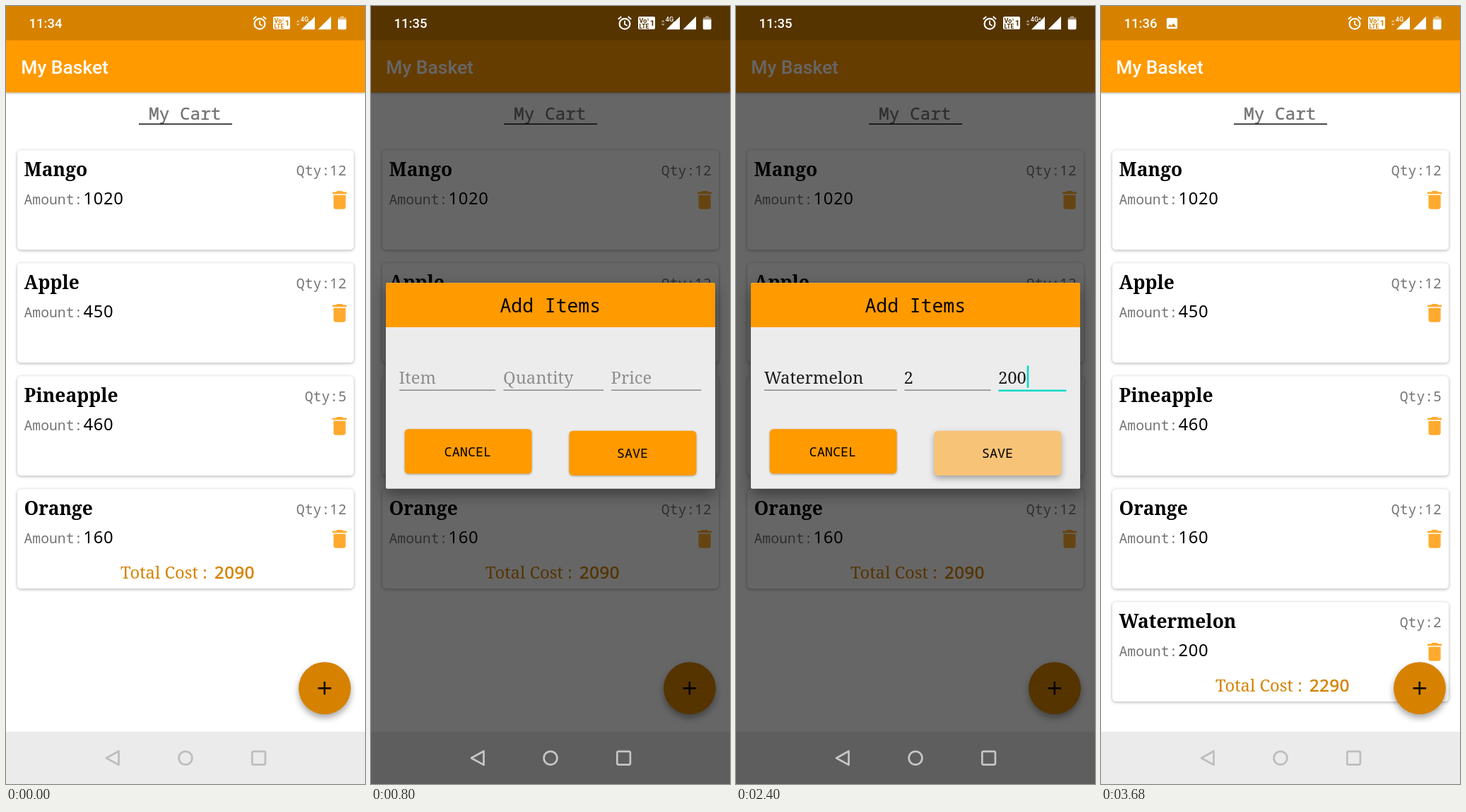
An HTML page for the animation above (4 s loop, 508 by 1102 pixels).

```html
<!DOCTYPE html>
<html lang="en">
<head>
<meta charset="utf-8">
<title>My Basket</title>
<style>
html, body { margin: 0; width: 100%; height: 100%; overflow: hidden; background: #fff; }
svg { display: block; width: 508px; height: 1102px; }
text { white-space: pre; }

.mono { font-family: "Noto Sans Mono", monospace; }
.serif { font-family: "Noto Serif", serif; }
.roboto { font-family: Roboto, sans-serif; font-weight: 500; }
/* Plain-zero digits on a 0.6em pitch */
.digits { font-family: "Noto Sans", sans-serif; letter-spacing: .028em; }

.name { font-size: 26.4px; font-weight: 700; }
.small { font-size: 19.8px; fill: #757575; }
.body { font-size: 23.8px; }
.total { fill: #d68200; }
.heavy { stroke: currentColor; stroke-width: .6px; }
.card { fill: #fff; filter: drop-shadow(0 1.5px 2px rgba(0,0,0,.32)); }
.button { fill: #ff9a00; filter: drop-shadow(0 1.5px 1.5px rgba(0,0,0,.3)); }
.pressed { fill: #f7c377; filter: drop-shadow(0 4px 4px rgba(0,0,0,.32)); }
.hint { fill: #8e8e8e; }
.rule { fill: none; stroke: #757575; stroke-width: 1.3; }

/* Five equal scenes: list, empty form, filled form, save pressed, updated list */
[class*="in-"], .nav { animation: 4s step-end infinite; }
.in-list { animation-name: list; }
.in-form { animation-name: form; }
.in-empty { animation-name: empty; }
.in-filled { animation-name: filled; }
.in-press { animation-name: press; }
.in-idle { animation-name: idle; }
.in-before { animation-name: before; }
.in-after { animation-name: after; }
.in-notice { animation-name: notice; }
.nav { animation-name: nav; fill: none; stroke-width: 2.7; stroke-linejoin: round; }
@keyframes list { 0% { opacity: 1 } 20%, 100% { opacity: 0 } }
@keyframes form { 0%, 80%, 100% { opacity: 0 } 20% { opacity: 1 } }
@keyframes empty { 0%, 40%, 100% { opacity: 0 } 20% { opacity: 1 } }
@keyframes filled { 0%, 80%, 100% { opacity: 0 } 40% { opacity: 1 } }
@keyframes press { 0%, 80%, 100% { opacity: 0 } 60% { opacity: 1 } }
@keyframes idle { 0%, 80%, 100% { opacity: 1 } 60% { opacity: 0 } }
@keyframes before { 0% { opacity: 1 } 80%, 100% { opacity: 0 } }
@keyframes after { 0% { opacity: 0 } 80%, 100% { opacity: 1 } }
@keyframes notice { 0%, 60% { opacity: 0 } 40%, 80%, 100% { opacity: 1 } }
@keyframes nav { 0%, 80%, 100% { stroke: #bdbdbd } 20% { stroke: #c6c6c6 } }
</style>
</head>
<body>
<svg viewBox="0 0 508 1102">
  <defs>
    <path id="trash" fill="#ffaa2e" transform="translate(454.9 53.7) scale(1.43)"
      d="M6 19c0 1.1.9 2 2 2h8c1.1 0 2-.9 2-2V7H6zM19 4h-3.5l-1-1h-5l-1 1H5v2h14z"/>
    <mask id="volte" class="roboto" maskUnits="userSpaceOnUse" x="376" y="12" width="30" height="24">
      <rect x="378" y="15" width="24" height="18" rx="2" fill="#fff"/>
      <g font-weight="700">
        <text x="379.5" y="23.6" font-size="9">Vo</text>
        <text x="379.5" y="31.8" font-size="8.5">LTE</text>
        <text x="394.8" y="28.4" font-size="11.5">1</text>
      </g>
      <path d="M391.6 17.5q1.4 1.7 0 3.6" fill="none" stroke="#000" stroke-width=".9"/>
    </mask>
  </defs>

  <rect width="508" height="1102" fill="#fff"/>
  <rect y="48" width="508" height="74.5" fill="#ff9a00" style="filter:drop-shadow(0 1px 1.5px rgba(0,0,0,.3))"/>
  <rect width="508" height="48.5" fill="#d68200"/>
  <text class="roboto" x="21.3" y="96" font-size="26.4" fill="#fff">My Basket</text>
  <text class="mono" x="202" y="161" font-size="24.4" fill="#757575" stroke="#757575" stroke-width=".4">My Cart</text>
  <path d="M188 167.2H320" stroke="#111" stroke-width="1.5"/>

  <g id="cards"></g>

  <circle cx="451" cy="966.3" r="37" fill="#d68200" style="filter:drop-shadow(0 5px 5px rgba(0,0,0,.35))"/>
  <path d="M441.5 966.3h18.6M450.8 957v18.6" stroke="#150d00" stroke-width="2.7"/>
  <rect y="1028" width="508" height="74" fill="#ebebeb"/>

  <rect class="in-form" width="508" height="1102" fill="#000" fill-opacity=".6"/>

  <g class="nav">
    <path d="M142 1065.2l17.5-9.7v19.4z"/>
    <circle cx="254" cy="1065.2" r="9.4"/>
    <rect x="348.3" y="1055.8" width="18.6" height="18.8" rx="2"/>
  </g>

  <g fill="#fff">
    <g class="roboto" font-size="18.5">
      <text class="in-list" x="32.6" y="30.5">11:34</text>
      <text class="in-form" x="32.6" y="30.5">11:35</text>
      <text class="in-after" x="32.6" y="30.5">11:36</text>
    </g>
    <path class="in-notice" fill-rule="evenodd"
      d="M94.5 17h12q1.6 0 1.6 1.6v12q0 1.6-1.6 1.6h-12q-1.6 0-1.6-1.6v-12q0-1.6 1.6-1.6zM94.7 29.6h11.6l-3.8-5-2.9 3.8-2-2.5z"/>
    <circle cx="359" cy="25.3" r="7.4" fill="none" stroke="#fff" stroke-width="2.2"/>
    <path d="M359 20.8v5l3.6 2.2M349.8 18.8l4.4-3.7M368.2 18.8l-4.4-3.7" fill="none" stroke="#fff" stroke-width="1.9"/>
    <rect x="376" y="12" width="30" height="24" mask="url(#volte)"/>
    <path d="M410.5 22.7l2.6-3 2.6 3zM410.5 25l2.6 3 2.6-3z" opacity=".5"/>
    <path d="M418 33.2l10.4-10.4V22H430l7-7v18.2z"/>
    <path d="M441.5 33.2L460 14.8v18.4z"/>
    <g class="roboto" font-size="9" font-weight="700">
      <text class="in-idle" x="416.8" y="21.8">4G</text>
      <text class="in-press" x="416.8" y="21.8">4G<tspan font-size="7" dy="-1.2">+</tspan></text>
    </g>
    <path d="M473.2 14.3h4.8v1.9h2q1.4 0 1.4 1.4v14.2q0 1.4-1.4 1.4h-8.8q-1.4 0-1.4-1.4V17.6q0-1.4 1.4-1.4h2z" opacity=".45"/>
    <path d="M469.8 19.2h11.6v12.6q0 1.4-1.4 1.4h-8.8q-1.4 0-1.4-1.4z"/>
  </g>

  <g class="in-form">
    <rect x="21" y="392.3" width="466" height="291.5" rx="2.6" fill="#ececec" style="filter:drop-shadow(0 8px 10px rgba(0,0,0,.4))"/>
    <path d="M21 455V395q0-2.7 2.6-2.7h460.8q2.6 0 2.6 2.7v60z" fill="#ff9a00"/>
    <text class="mono" x="182.5" y="434.3" font-size="26.4">Add Items</text>

    <g class="in-empty">
      <g class="serif body hint">
        <text x="39.6" y="535">Item</text>
        <text x="187" y="535">Quantity</text>
        <text x="339.6" y="535">Price</text>
      </g>
      <path class="rule" d="M40 544.2H176M187.4 544.2H329M340 544.2H467.3"/>
    </g>
    <g class="in-filled">
      <g class="serif body" fill="#1c1c1c">
        <text x="39.8" y="535">Watermelon</text>
        <text x="237.6" y="535">2</text>
        <text x="371" y="535">200</text>
      </g>
      <path class="rule" d="M40 544.2H227.6M238.3 544.2H360.5"/>
      <path d="M371.4 544.8H467.3M413 509.3v31.5" stroke="#03dac5" stroke-width="2.6"/>
    </g>

    <rect class="button" x="47.7" y="599.3" width="179.8" height="63.2" rx="5.3"/>
    <g class="in-idle"><rect class="button" x="280.4" y="601.7" width="180" height="63.2" rx="5.3"/></g>
    <g class="in-press"><rect class="pressed" x="280.4" y="601.7" width="180" height="63.2" rx="5.3"/></g>
    <g class="mono" font-size="18.5">
      <text x="103.6" y="637.8">CANCEL</text>
      <text x="347.8" y="640.4">SAVE</text>
    </g>
  </g>
</svg>
<script>
const items = [
  ["Mango", 12, 1020],
  ["Apple", 12, 450],
  ["Pineapple", 5, 460],
  ["Orange", 12, 160],
  ["Watermelon", 2, 200]
];

const card = ([name, qty, amount], i) => `
  <g transform="translate(0 ${204 + 160 * i})" class="${i === 4 ? "in-after" : ""}">
    <rect class="card" x="16" y=".2" width="476" height="141" rx="5.3"/>
    <text class="serif name" x="25.6" y="37">${name}</text>
    <text class="mono small" x="${482.2 - 11.9 * (4 + `${qty}`.length)}" y="35.6">Qty:<tspan class="digits">${qty}</tspan></text>
    <text class="mono small" x="25.4" y="77">Amount:</text>
    <text class="digits body" x="109.4" y="77">${amount}</text>
    <use href="#trash"/>
  </g>`;

const total = (sum, top, scene) => `
  <g class="total body ${scene}" color="#d68200">
    <text class="serif" x="162" y="${top + 127.3}">Total Cost :</text>
    <text class="digits heavy" x="295" y="${top + 127.3}">${sum}</text>
  </g>`;

document.getElementById("cards").innerHTML =
  items.map(card).join("") + total(2090, 684, "in-before") + total(2290, 844, "in-after");
</script>
</body>
</html>
```
